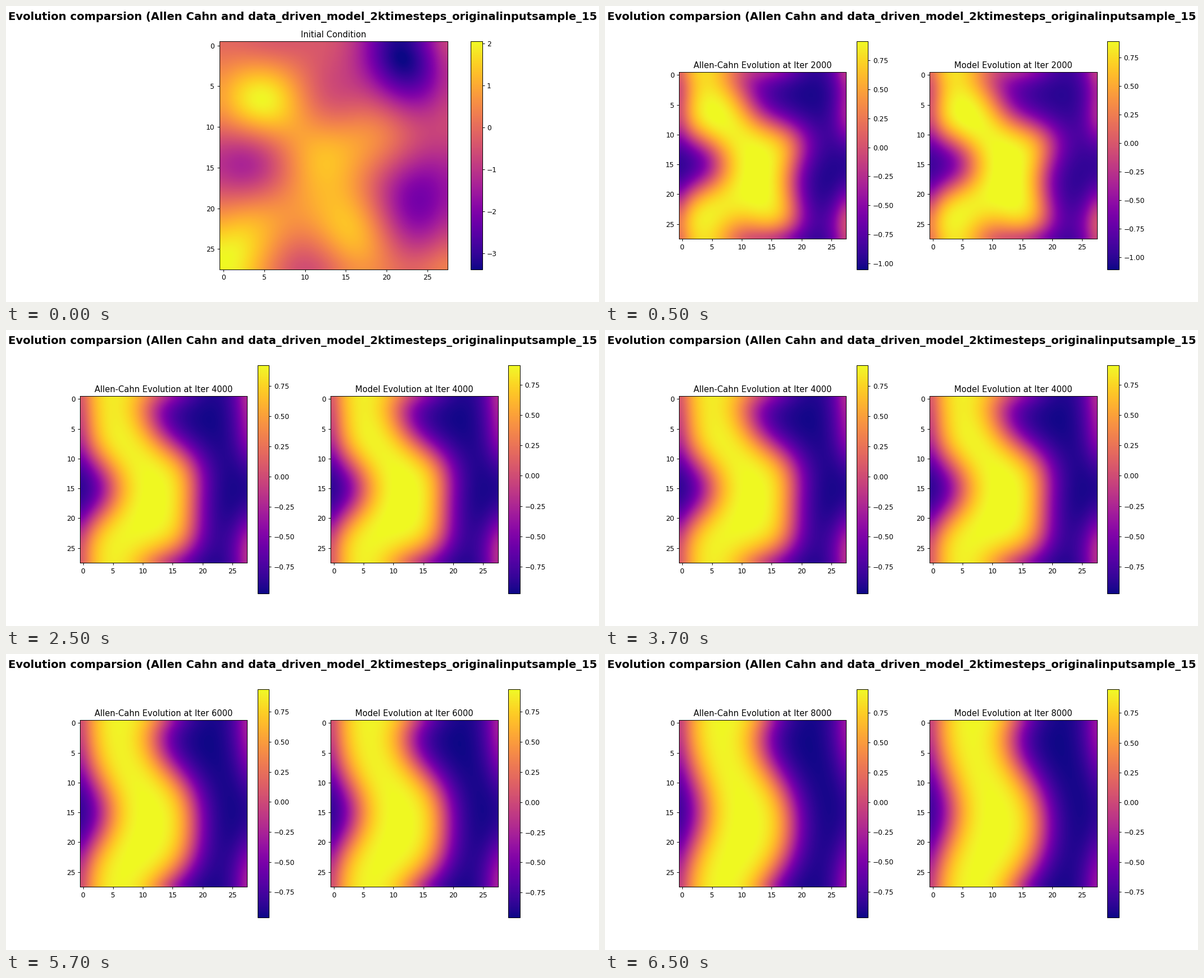
A matplotlib script that plays this animation: 1058x529 px, repeating every 8 s.

```python
import numpy as np
import matplotlib.pyplot as plt
from matplotlib.animation import FuncAnimation

N = 28
EPS2 = 4.5       # squared interface length, in cells
DT = .01
STEPS = 100      # solver steps between two shown states
REACH = 3.9      # correlation length of the starting field
HEADING = ("Evolution comparsion (Allen Cahn and "
           "data_driven_model_2ktimesteps_originalinputsample_15")

# Key points (x, y, value) of the starting field: peaks, dips, saddles and rim
PEAKS = [(4.6, 7.2, 2.05), (0, 27, 2.05), (11.5, 13.5, 1.3), (15, 22, 1.4),
         (4.5, 21.3, 1.05), (17.5, 25.5, .9), (19, 11, .5)]
DIPS = [(21.5, .5, -3.4), (24, 5, -2.4), (23, 18.5, -2.1), (3.2, 14.3, -1.3),
        (27, 14.5, -1.3), (24, 24, -1.1), (13, 6, -.5), (11, 27, -.5)]
SADDLES = [(8, 11.5, .7), (9, 19, .75), (18, 16, .1), (7, 25.5, .25),
           (9, 4, .45), (17, 3, -1.4)]
RIM = [(0, 2, .3), (6, 0, -.3), (27, 0, -.8), (27, 7, -.9), (22, 27, -.1),
       (27, 27, .35)]

# Colour range of each state: solver panel, model panel
RANGES = [((-1.052, .912), (-1.107, .890)), ((-.972, .922), (-.971, .909)),
          ((-.961, .934), (-.958, .936)), ((-.967, .945), (-.965, .947))]


def start_field():
    """Smooth Gaussian surface through the key points."""
    px, py, v = np.array(PEAKS + DIPS + SADDLES + RIM).T

    def kernel(x, y):
        d2 = (x[..., None] - px) ** 2 + (y[..., None] - py) ** 2
        return np.exp(-d2 / (2 * REACH ** 2))

    y, x = np.mgrid[0:N, 0:N]
    weights = np.linalg.solve(kernel(px, py) + .005 * np.eye(len(v)),
                              v - v.mean())
    return v.mean() + kernel(x, y) @ weights


def evolve(u):
    """Allen-Cahn flow u' = eps^2 lap(u) + u - u^3 on a periodic grid."""
    for _ in range(STEPS):
        lap = sum(np.roll(u, s, a) for s in (1, -1) for a in (0, 1)) - 4 * u
        u = u + DT * (EPS2 * lap + u - u ** 3)
    return u


def panel(pos, data, title, limits):
    ax = fig.add_subplot(pos)
    im = ax.imshow(data, cmap="plasma", interpolation="bicubic",
                   vmin=limits[0], vmax=limits[1])
    ax.set_title(title)
    fig.colorbar(im, ax=ax)


states = [start_field()]
for _ in RANGES:
    states.append(evolve(states[-1]))


def draw(i):
    fig.clear()
    fig.suptitle(HEADING, y=.982, fontsize=16, fontweight="bold")
    n = (i + 3) // 4
    if n == 0:
        panel(111, states[0], "Initial Condition", (-3.385, 2.05))
        return
    for pos, name, limits in zip((121, 122), ("Allen-Cahn", "Model"),
                                 RANGES[n - 1]):
        panel(pos, states[n], f"{name} Evolution at Iter {2000 * n}", limits)


plt.rcParams["font.family"] = "DejaVu Sans"
fig = plt.figure(figsize=(12, 6), dpi=88.16667)
anim = FuncAnimation(fig, draw, frames=16, interval=500, repeat=True,
                     repeat_delay=0, cache_frame_data=False)
plt.show()
```
